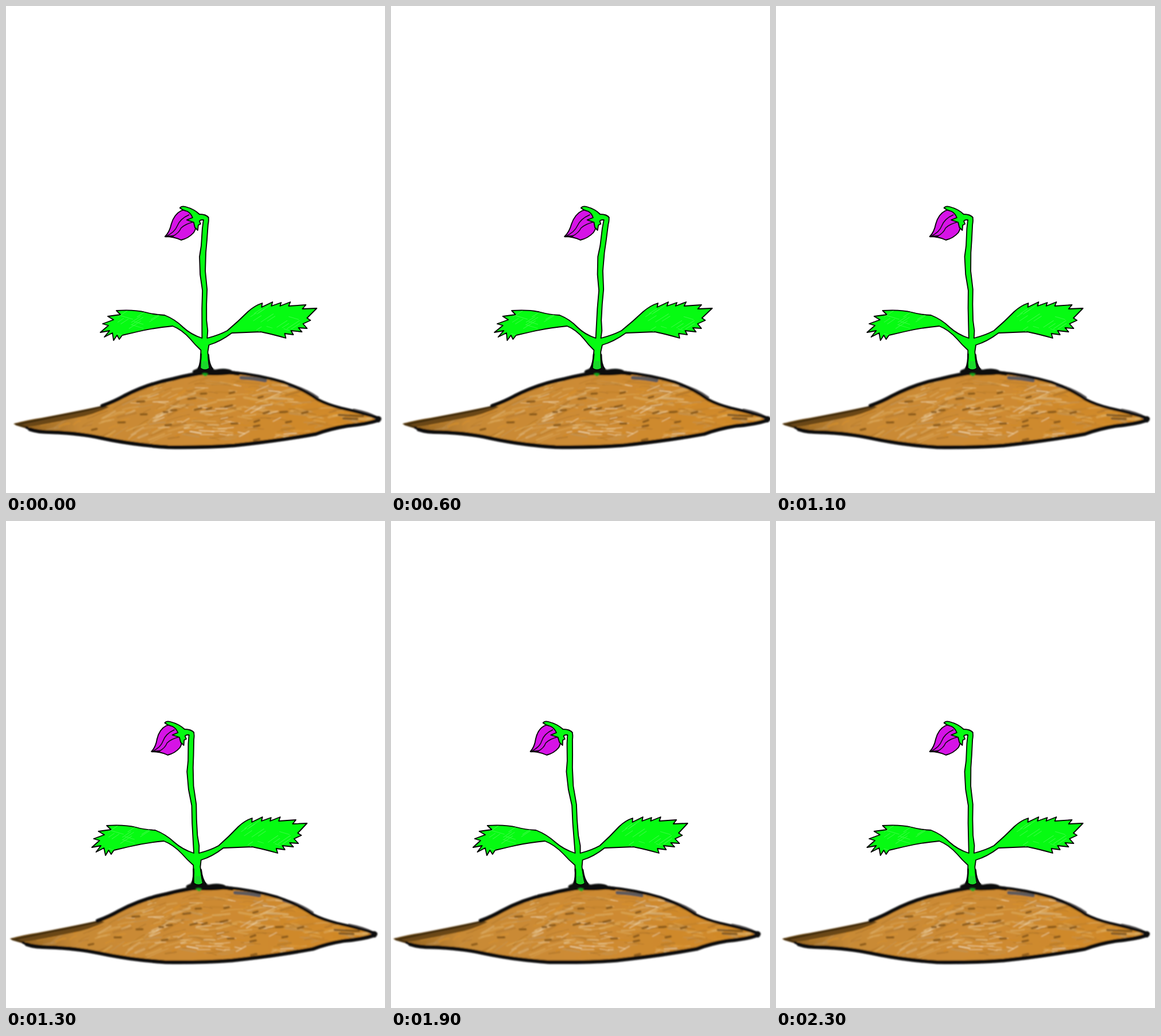
Recreate the animation shown at these times as an HTML page. Size 660x849 px, loop 2400 ms.

```html
<!DOCTYPE html>
<html lang="en">
<head>
<meta charset="utf-8">
<title>Swaying bud</title>
<style>
  html, body { margin: 0; width: 100%; height: 100%; overflow: hidden; background: #fff; }
  svg { display: block; width: 660px; height: 849px; }
  path { stroke-linecap: round; stroke-linejoin: round; }
  .line { fill: none; stroke: #0b0b0d; }
  .ink { stroke: #000; stroke-width: 1.8; }
  .leaf { fill: #06fb12; }
</style>
</head>
<body>
<svg viewBox="0 0 660 849">
  <defs>
    <filter id="soft" x="-5%" y="-20%" width="110%" height="140%"><feGaussianBlur stdDeviation="1"/></filter>
    <linearGradient id="soil" x1="0" x2="1">
      <stop offset="0" stop-color="#8a5c1c"/>
      <stop offset=".18" stop-color="#c88a36"/>
      <stop offset=".5" stop-color="#cd8b34"/>
      <stop offset="1" stop-color="#d18825"/>
    </linearGradient>
    <clipPath id="inside"><path id="clipShape"/></clipPath>
    <clipPath id="leafArea"><path id="leafShape"/></clipPath>
  </defs>
  <g id="scene">
    <g filter="url(#soft)">
      <path id="mound" fill="url(#soil)"/>
      <g id="grain" clip-path="url(#inside)" fill="none"></g>
      <path fill="#6b4715" d="M14 728Q40 721 62 718Q110 709 168 697L180 699Q152 713 122 718Q85 726 50 732Q28 735 14 729Z"/>
      <path fill="none" stroke="#3d2a0e" stroke-width="3" d="M22 729Q62 721 90 715Q130 708 166 699"/>
      <path fill="none" stroke="#4a3110" stroke-width="4" d="M18 729L38 735"/>
      <path fill="none" stroke="#5d5a5c" stroke-width="6" d="M410 648Q432 649 452 653M494 661Q522 669 542 683M606 705Q632 710 645 718"/>
      <path class="line" stroke-width="6.5" d="M168 697Q188 690 206 680Q246 659 292 650Q322 642 350 639Q380 637 405 641"/>
      <path class="line" stroke-width="5" d="M396 639Q440 643 484 656Q516 667 543 686Q560 695 584 701Q620 709 651 719"/>
      <path class="line" stroke-width="6.5" d="M42 738Q56 743 80 743Q130 745 166 753Q221 765 282 769Q342 770 398 766Q474 758 540 746Q564 737 594 732Q628 729 649 722"/>
      <path class="line" stroke-width="4" d="M649 717Q655 719 649 724M36 735L44 739"/>
      <path fill="#0a0c0b" d="M326 640Q323 635 332 633Q338 629 339 622L354 622Q358 631 364 634Q382 630 393 635Q400 640 386 643Q345 646 326 640Z"/>
      <path fill="#12a01d" d="M342 641Q346 639 352 641L350 645Q345 647 342 641Z"/>
    </g>
    <path id="plant" class="ink leaf"/>
    <g id="veins" clip-path="url(#leafArea)" fill="none" stroke="#66fb6c" stroke-width="1" opacity=".55"></g>
    <path class="line" stroke-width="2.8" d="M340 607Q340 622 336 632M353 608Q354 625 360 633"/>
    <path fill="#19d92a" d="M342 619H352L354 631Q347 636 340 631Z"/>
    <path class="ink" fill="#d613e6" d="M278 402Q286 394 289 380Q294 363 306 357Q314 354 322 358L333 377Q333 387 328 395Q319 405 306 408Q294 402 278 402Z"/>
    <path class="line" stroke-width="1.5" d="M281 401Q295 394 299 384Q304 371 320 364M292 401Q302 396 306 387Q313 380 329 376"/>
    <path class="line" stroke-width="2.6" d="M279 402L292 401"/>
    <path class="ink leaf" d="M345 373Q340 372 338 375L340 380L336 382L335 391L330 386L328 377L316 373L326 369Q323 361 317 358Q309 356 304 352Q307 348 314 350Q329 354 338 363Q350 363 354 369"/>
  </g>
</svg>
<script>
const $ = id => document.getElementById(id);
const NS = 'http://www.w3.org/2000/svg';

let seed = 41;
const rand = () => (seed = seed * 16807 % 2147483647) / 2147483647;
const between = (a, b) => a + (b - a) * rand();

function addStroke(parent, d, attrs = {}) {
  const p = document.createElementNS(NS, 'path');
  p.setAttribute('d', d);
  for (const k in attrs) p.setAttribute(k, attrs[k]);
  parent.appendChild(p);
}

const moundPath = 'M16 729Q60 721 110 711L168 698Q188 690 206 680Q246 659 292 650Q322 642 350 640' +
  'Q400 637 440 645Q462 649 484 656Q516 667 543 686Q560 695 584 701Q620 709 651 719L649 722' +
  'Q628 729 594 732Q564 737 540 746Q474 758 398 766Q342 770 282 769Q221 765 166 753Q130 745 80 743Q56 743 38 735Z';
$('mound').setAttribute('d', moundPath);
$('clipShape').setAttribute('d', moundPath);

// Stem, both leaves and the foot as one outline
const plantPath = 'M353 368Q355 371 353 381L351 408L349 430L348 462L351 494L350 520L350 548L352 566L351 579' +
  'Q371 574 386 566Q405 550 422 533Q434 522 447 518L446 525L465 516L463 523L480 517L478 523L496 516L493 523' +
  'L523 521L517 528L542 527L525 544L531 548L518 554L525 562L510 561L516 568L497 566L501 573L486 571L488 579' +
  'Q468 573 444 568Q418 569 394 570Q374 585 354 591L352 603L354 631Q347 637 339 631L340 600Q330 591 322 581' +
  'Q307 564 291 558Q258 561 229 568L203 574L198 581L194 574L188 583L186 570L172 577L181 566L165 569L179 557' +
  'L169 554L188 547L178 541L200 538L193 531Q224 529 244 534Q258 538 277 539Q295 546 309 560Q323 573 342 579' +
  'L342 548L342 527L343 496L339 468L338 437L341 418L343 388L345 373';
$('plant').setAttribute('d', plantPath);
$('leafShape').setAttribute('d', plantPath);

// Brushed soil: streaks fan out from left to right over the hill
const grain = $('grain');
const tones = ['#deae62', '#b87a2a', '#d9922f', '#c1955a', '#e0bb80', '#ad742b', '#d48a28'];
for (let i = 0; i < 420; i++) {
  const x = between(60, 630), y = between(648, 764);
  const lean = x < 300 ? between(-.65, -.1) : between(-.35, .3);
  const len = between(12, 42), dx = len * Math.cos(lean), dy = len * Math.sin(lean);
  addStroke(grain, `M${x} ${y}q${dx / 2} ${dy / 2 + between(-3, 1)} ${dx} ${dy}`, {
    stroke: tones[Math.floor(rand() * tones.length)],
    'stroke-width': between(1.2, 4.2),
    opacity: between(.3, .7)
  });
}
for (let i = 0; i < 55; i++) {
  const x = between(215, 510), y = between(660, 752), lean = between(-.55, .25), len = between(8, 28);
  addStroke(grain, `M${x} ${y}l${len * Math.cos(lean)} ${len * Math.sin(lean)}`, {
    stroke: '#f3dfba', 'stroke-width': between(.8, 1.8), opacity: between(.4, .75)
  });
}
const flecks = [[235, 712], [275, 708], [288, 705], [229, 690], [318, 685], [340, 676], [390, 675], [440, 683],
  [449, 710], [488, 726], [432, 733], [433, 725], [393, 728], [350, 703], [382, 699], [329, 704], [278, 731],
  [150, 739], [478, 708], [516, 710], [432, 757], [196, 726]];
for (const [x, y] of flecks)
  addStroke(grain, `M${x} ${y}l${between(6, 13)} ${between(-3, 0)}`, { stroke: '#85551a', 'stroke-width': 4, opacity: .8 });
addStroke(grain, 'M580 713L622 715M588 719L612 720', { stroke: '#79501d', 'stroke-width': 4, opacity: .8 });

function hatch(x0, x1, y0, y1, n) {
  for (let i = 0; i < n; i++) {
    const len = between(8, 22), dir = rand() < .7 ? -.65 : .3;
    addStroke($('veins'), `M${between(x0, x1)} ${between(y0, y1)}l${len} ${len * dir}`);
  }
}
hatch(185, 255, 538, 572, 14);
hatch(425, 505, 530, 568, 16);

// Sway: a shear about the bottom edge, wider to the right than to the left
const STEP = 100, COUNT = 24, PEAK = 5, FLOOR = 849, REACH = 464;
const REST = -10.7, RIGHT = 37, LEFT = 30;

function pose(step) {
  const c = Math.cos((step - PEAK) * 2 * Math.PI / COUNT);
  const k = (REST + c * (c > 0 ? RIGHT : LEFT)) / REACH;
  $('scene').setAttribute('transform', `matrix(1 0 ${-k} 1 ${k * FLOOR} 0)`);
}

const start = performance.now();
let last = -1;
function tick(now) {
  const step = Math.floor(Math.max(0, now - start) / STEP) % COUNT;
  if (step !== last) pose(last = step);
  requestAnimationFrame(tick);
}
pose(0);
requestAnimationFrame(tick);
</script>
</body>
</html>
```
